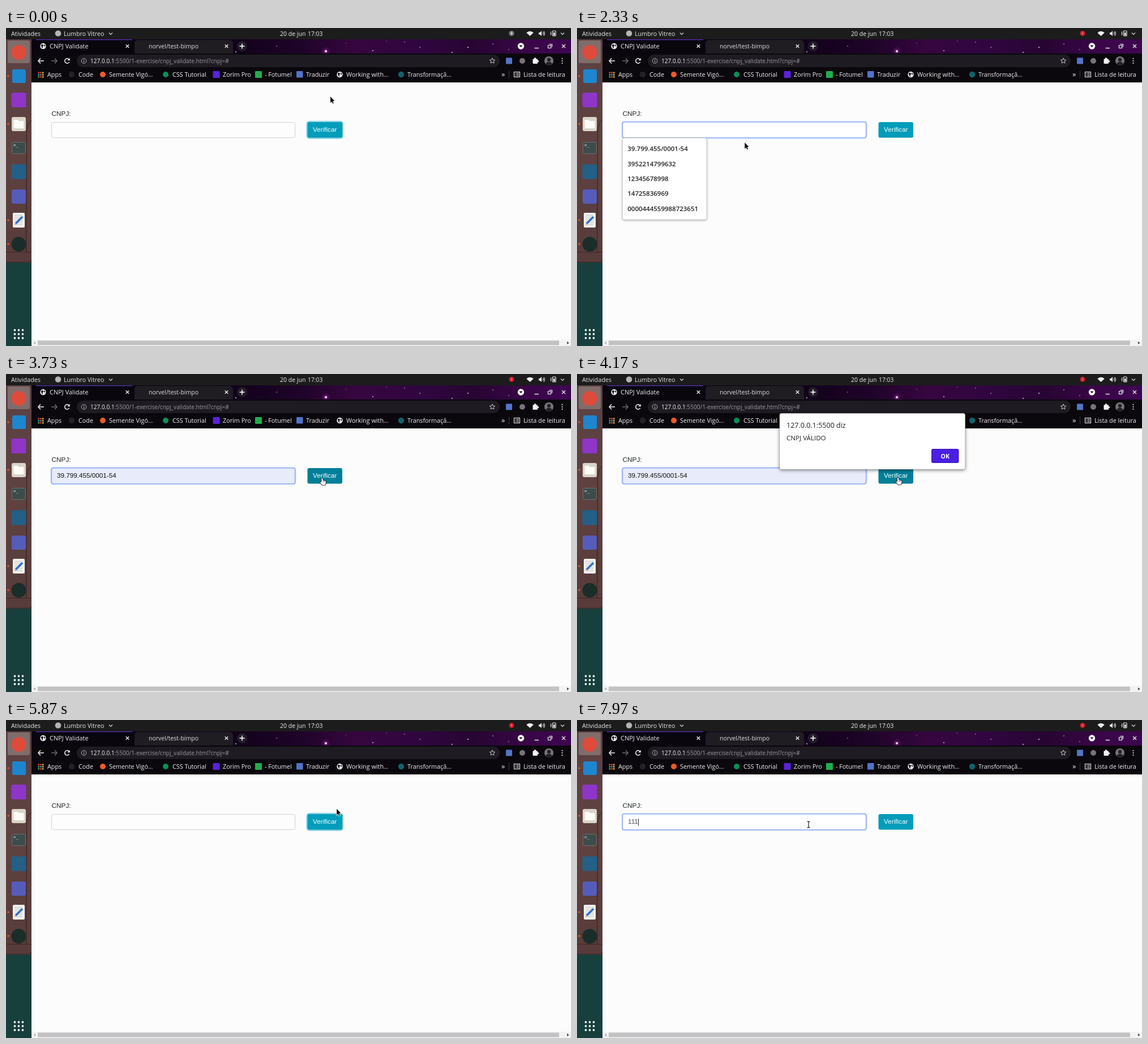
Recreate the animation shown at these times as an HTML page with a canvas. Size 998x561 px, loop 8000 ms.

```html
<!DOCTYPE html>
<html lang="pt-BR">
<head>
<meta charset="utf-8">
<title>CNPJ Validate</title>
<style>
html, body { margin: 0; width: 100%; height: 100%; overflow: hidden; background: #fcfcfc; }
canvas { display: block; width: 998px; height: 561px; }
</style>
</head>
<body>
<canvas id="stage"></canvas>
<script>
const W = 998, H = 561, LOOP = 8000;
const UI = '"Open Sans", "Noto Sans", sans-serif';
const PAGE = '"Liberation Sans", Arial, sans-serif';
const canvas = document.getElementById('stage');
const dpr = window.devicePixelRatio || 1;
canvas.width = Math.round(W * dpr);
canvas.height = Math.round(H * dpr);
let c = canvas.getContext('2d');

// --- drawing helpers ---
function box(x, y, w, h, color, r = 0) {
  c.fillStyle = color;
  c.beginPath();
  c.roundRect(x, y, w, h, r);
  c.fill();
}

function frame(x, y, w, h, color, line = 1, r = 0) {
  c.strokeStyle = color;
  c.lineWidth = line;
  c.beginPath();
  c.roundRect(x, y, w, h, r);
  c.stroke();
}

function dot(x, y, r, color) {
  c.fillStyle = color;
  c.beginPath();
  c.arc(x, y, r, 0, Math.PI * 2);
  c.fill();
}

function path(points, closed) {
  c.beginPath();
  points.forEach(([x, y]) => c.lineTo(x, y));
  if (closed) c.closePath();
}

function line(points, color, width = 1) {
  path(points);
  c.strokeStyle = color;
  c.lineWidth = width;
  c.stroke();
}

function poly(points, color) {
  path(points, true);
  c.fillStyle = color;
  c.fill();
}

// y is the middle of the capitals
function text(s, x, y, size, color, font = UI, weight = 400, align = 'left') {
  c.font = `${weight} ${size}px ${font}`;
  c.textAlign = align;
  c.fillStyle = color;
  c.fillText(s, x, y + size * 0.36);
}

function at(x, y, draw) {
  c.save();
  c.translate(x, y);
  draw();
  c.restore();
}

function shadow(color, blur, dy) {
  c.shadowColor = color;
  c.shadowBlur = blur * dpr;
  c.shadowOffsetY = dy * dpr;
}

function cross(x, y, r) {
  line([[x - r, y - r], [x + r, y + r]], '#eee', 1.3);
  line([[x + r, y - r], [x - r, y + r]], '#eee', 1.3);
}

function chevron(x, y) {
  line([[x - 3, y - 1.5], [x, y + 1.5], [x + 3, y - 1.5]], '#ddd', 1.2);
}

function arrowLine(x, y, dir, color) {
  line([[x - 5 * dir, y], [x + 5 * dir, y]], color, 1.5);
  line([[x + dir, y - 4.5], [x + 5 * dir, y], [x + dir, y + 4.5]], color, 1.5);
}

function globe(x, y) {
  dot(x, y, 5.2, '#f2f2f2');
  poly([[x - 4, y - 2], [x - 1, y - 3.5], [x + 1, y - 1], [x - 1, y + 1], [x, y + 4], [x - 2, y + 3]], '#15121a');
  poly([[x + 1.5, y - 3.5], [x + 4, y - 1], [x + 3, y + 1], [x + 1.5, y - 1]], '#15121a');
}

// --- desktop ---
function topBar() {
  box(0, 0, W, 20, '#1c1c1c');
  text('Atividades', 9, 10, 10.8, '#e6e6e6');
  dot(92, 9.5, 5.3, '#b4b4b4');
  text('Lumbro Vitreo', 102, 10, 10.7, '#e6e6e6');
  chevron(185, 10);
  text('20 de jun', 484, 10, 10.5, '#f0f0f0');
  text('17:03', 533, 10, 10.3, '#f0f0f0');
  c.fillStyle = '#f2f2f2';
  c.beginPath();
  c.moveTo(925.5, 14);
  c.arc(925.5, 14, 8.2, -Math.PI * 0.77, -Math.PI * 0.23);
  c.fill();
  poly([[941, 8], [943, 8], [946, 5], [946, 14], [943, 11.5], [941, 11.5]], '#f2f2f2');
  c.strokeStyle = '#f2f2f2';
  for (const r of [2.5, 5]) {
    c.lineWidth = 1.1;
    c.beginPath();
    c.arc(946.5, 9.7, r, -0.9, 0.9);
    c.stroke();
  }
  frame(965.5, 5, 5.5, 9, '#f2f2f2', 1.2, 1);
  box(967, 8, 2.5, 5, '#f2f2f2');
  line([[963, 6], [961.8, 9.5], [963.2, 9.5], [962, 13]], '#e6e6e6');
  chevron(983, 10);
}

function paper(y) {
  box(12, y - 13, 21, 26, '#f1f1ef', 2);
  for (let i = 0; i < 6; i++) box(15, y - 9 + i * 3.3, 14, 0.8, '#b9b9b9');
  line([[17, y + 6], [29, y - 6]], '#2f6fce', 3.6);
  poly([[14.5, y + 9], [15.8, y + 4.8], [18.4, y + 7.4]], '#e6bd7d');
}

function dock() {
  box(0, 20, 45, H, '#173f3c');
  const g = c.createLinearGradient(0, 20, 0, 414);
  g.addColorStop(0, '#5b4144');
  g.addColorStop(0.5, '#5f4240');
  g.addColorStop(1, '#573b3a');
  box(0, 20, 45, 394, g, [0, 0, 4, 0]);
  line([[45, 163], [39, 168], [36.5, 182], [35.5, 395]], '#33201f');
  line([[0, 395.5], [45, 395.5]], '#3b2827');
  line([[0, 413], [41, 413], [45, 410]], '#3a2525', 1.2);
  box(3, 22, 39, 40, '#806d6b', 3);

  dot(22.5, 43, 13, '#df4b3b');
  box(11, 73, 24, 24, '#1d86cf', 3);
  box(9.5, 114, 26, 26, '#8f35c8', 3);
  box(10, 157, 25, 25, '#dad5c8', 3);
  box(13.5, 162, 8, 4, '#fff', 1);
  box(13.5, 164, 18, 13, '#fdfcf6', 1);
  box(10, 201, 25, 21, '#3d4c4b', 2);
  frame(10.5, 201.5, 24, 20, '#69706c', 1, 2);
  text('>_', 13, 206.5, 7.5, '#fff', '"DejaVu Sans Mono", monospace');
  box(9.5, 240.5, 26, 26, '#235f86', 3);
  box(10, 285, 25, 25, '#565cba', 3);
  paper(339);
  dot(22.5, 381.5, 13, '#1a2d29');
  for (const y of [85, 169, 339, 381]) dot(4, y, 1.7, '#e4552b');
  for (let i = 0; i < 9; i++) dot(15.5 + (i % 3) * 7, 533 + Math.floor(i / 3) * 7, 1.9, '#f2f5f4');
}

// --- browser ---
function tabStrip() {
  const g = c.createLinearGradient(45, 0, W, 0);
  [[0, '#0a0310'], [0.37, '#10021a'], [0.5, '#1f0429'], [0.6, '#36063f'], [0.72, '#300640'],
   [0.82, '#270532'], [0.92, '#3a0648'], [1, '#3d0550']].forEach(s => g.addColorStop(...s));
  box(45, 20, 953, 26, g);
  const glow = c.createRadialGradient(565, 41, 0, 565, 41, 9);
  glow.addColorStop(0, '#8a2492');
  glow.addColorStop(1, 'rgba(60,8,70,0)');
  box(555, 30, 20, 16, glow);
  box(45, 45, 953, 51, '#0a080d');
  box(125, 47, 747, 22, '#1e1c22', 11);
  [[565, 41, 2], [648, 40, 0.9], [704, 25, 0.7], [731, 34, 0.8], [788, 43, 0.9], [816, 34, 1],
   [860, 28, 0.8], [478, 32, 0.7], [406, 42, 0.9], [672, 23, 0.6], [600, 27, 0.5], [888, 38, 0.7]]
    .forEach(([x, y, r]) => dot(x, y, r, '#f4dcfa'));

  box(51, 20, 174, 26, '#09060e', [6, 6, 0, 0]);
  line([[53, 20.6], [223, 20.6]], '#5930bf', 1.4);
  box(227, 21, 174, 24, '#1f1c22', [6, 6, 0, 0]);
  globe(65.5, 32);
  text('CNPJ Validate', 77, 32.2, 11, '#f0f0f0');
  cross(214.5, 32, 2.8);
  text('norvel/test-bimpo', 252, 32.2, 10.5, '#e0e0e0');
  cross(389.5, 32, 2.8);
  dot(417, 32, 9, '#241b29');
  line([[412.5, 32], [421.5, 32]], '#fff', 1.6);
  line([[417, 27.5], [417, 36.5]], '#fff', 1.6);

  dot(909.5, 32, 5.7, '#f8f8f8');
  poly([[906.5, 30.5], [912.5, 30.5], [909.5, 34]], '#17121b');
  line([[933.5, 35.5], [941, 35.5]], '#f0f0f0', 1.4);
  frame(957.5, 30.5, 5, 5, '#f0f0f0', 1.2);
  line([[959.5, 28.5], [964.5, 28.5], [964.5, 33.5]], '#f0f0f0', 1.2);
  cross(985, 32, 3);
}

function toolbar() {
  arrowLine(62, 58, -1, '#f2f2f2');
  arrowLine(85, 58, 1, '#6e6b70');
  c.strokeStyle = '#f2f2f2';
  c.lineWidth = 1.5;
  c.beginPath();
  c.arc(108, 58, 4.2, 0.5, 5.5);
  c.stroke();
  poly([[112.8, 53], [112.8, 57.3], [108.5, 57.3]], '#f2f2f2');

  c.strokeStyle = '#b8b8b8';
  c.lineWidth = 1;
  c.beginPath();
  c.arc(137.5, 58, 4.3, 0, 7);
  c.stroke();
  box(137, 57.2, 1.1, 3.3, '#b8b8b8');
  box(137, 55.2, 1.1, 1.1, '#b8b8b8');
  const host = '127.0.0.1';
  text(host, 149, 58, 10.1, '#f0f0f0');
  text(':5500/1-exercise/cnpj_validate.html?cnpj=#', 149 + c.measureText(host).width, 58, 10.1, '#9b9b9f');

  const star = [];
  for (let i = 0; i < 11; i++) {
    const a = i * Math.PI / 5 - Math.PI / 2, r = i % 2 ? 2.3 : 5;
    star.push([859 + Math.cos(a) * r, 58 + Math.sin(a) * r]);
  }
  line(star, '#c8c8c8');
  box(883, 52.5, 11, 11, '#5274c9', 1);
  dot(912, 58, 5, '#77737a');
  box(930.5, 54.5, 8.5, 8.5, '#f2f2f2', 1);
  dot(934.5, 54, 1.8, '#f2f2f2');
  dot(939.5, 58.7, 1.8, '#f2f2f2');
  c.save();
  c.beginPath();
  c.arc(959, 58, 8, 0, 7);
  c.clip();
  box(951, 50, 16, 16, '#777479');
  dot(959, 56, 3.2, '#242126');
  dot(959, 66, 6.5, '#242126');
  c.restore();
  for (const y of [54, 58, 62]) dot(982.5, y, 1.1, '#f2f2f2');
}

function bookmarks() {
  const tints = ['#e0443a', '#e0443a', '#e9b52d', '#49a75a', '#4a86e8', '#e9b52d', '#49a75a', '#e0443a', '#e9b52d'];
  tints.forEach((t, i) => box(56.5 + (i % 3) * 3.7, 77.5 + Math.floor(i / 3) * 3.7, 2.6, 2.6, t));
  dot(116, 82, 5.3, '#232127');
  dot(171, 82, 5, '#f05a28');
  dot(282, 82, 5, '#0a8e58');
  box(365.5, 76, 12, 12, '#5a22dc', 1);
  box(440, 76, 12, 12, '#1fae4c', 1);
  box(513, 76, 11.5, 11.5, '#5274c9', 1);
  globe(589.5, 82);
  dot(698, 82, 5.2, '#12626b');
  [['Apps', 73], ['Code', 128], ['Semente Vigó…', 182], ['CSS Tutorial', 294], ['Zorim Pro', 383],
   ['- Fotumel', 457], ['Traduzir', 530], ['Working with…', 601], ['Transformaçã…', 709], ['Lista de leitura', 914]]
    .forEach(([s, x]) => text(s, x, 82, 10.8, '#f0f0f0'));
  text('»', 875, 81.5, 13, '#f0f0f0');
  line([[888.5, 75], [888.5, 89]], '#3c3940');
  frame(897.5, 77.5, 10, 9, '#e8e8e8', 1.1);
  for (const y of [79.7, 82, 84.3]) {
    box(899.3, y - 0.5, 1.2, 1, '#e8e8e8');
    box(901.5, y - 0.5, 4.5, 1, '#e8e8e8');
  }
}

function pageBase() {
  box(45, 96, 953, 465, '#fcfcfc');
  text('CNPJ:', 80.5, 151, 11.8, '#212529', PAGE);
  box(45, 550, 953, 11, '#f3f3f3');
  box(56, 551.5, 921, 8, '#c2c2c5');
  poly([[49, 555.5], [52, 553], [52, 558]], '#a3a3a3');
  poly([[994.5, 555.5], [991, 553], [991, 558]], '#3f3f3f');
}

// --- moving parts ---
const ENTRIES = ['39.799.455/0001-54', '3952214799632', '12345678998', '14725836969', '0000444559988723651'];
const T = {
  record: 400, focus: 1700, list: 1800, hoverRow: 2480, pick: 2900, picked: 3080,
  alert: 4080, leave: 4400, close: 5520, refocus: 6370, relist: 6470,
  keys: [7330, 7560, 7800]
};
const ROUTE = [
  [0, 573, 121], [400, 573, 121], [1300, 403, 184.5], [1950, 403, 184.5], [2600, 233, 212.5], [3080, 233, 212.5],
  [3800, 567, 183], [4400, 567, 183], [5150, 646, 145], [5650, 646, 145], [6250, 444.5, 183],
  [6750, 444.5, 183], [7250, 409, 184.5], [LOOP, 409, 184.5]
];
const between = (t, a, b) => t >= a && t < b;

function pointer(t) {
  const i = ROUTE.findIndex(p => p[0] > t);
  const [t0, x0, y0] = ROUTE[i - 1], [t1, x1, y1] = ROUTE[i];
  let k = (t - t0) / (t1 - t0);
  k = k * k * (3 - 2 * k);
  return [x0 + (x1 - x0) * k, y0 + (y1 - y0) * k];
}

const inside = ([x, y], l, tp, r, b) => x > l && x < r && y > tp && y < b;

function indicator(t) {
  const on = t >= T.record;
  dot(893, 9.5, 4.6, on ? '#c81e28' : '#77777a');
  box(891.7, 6.5, 2.6, 5.5, on ? '#e8525a' : '#c4c4c6', 1);
}

function input(t, value, filled, focused) {
  if (focused) {
    frame(80.5, 166, 430, 27.5, '#c4d4fc', 4, 3);
    box(80.5, 166, 430, 27.5, filled ? '#e8ecfa' : '#fff', 3);
    frame(80.5, 166, 430, 27.5, '#86a5f4', 1.2, 3);
  } else {
    box(80.5, 166.5, 430, 27, '#fdfdfd', 3);
    frame(80.5, 166.5, 430, 27, '#cdd1d9', 1, 3);
  }
  text(value, 90, 179.2, 11.7, filled ? '#101010' : '#495057', PAGE);
  const end = 90.5 + c.measureText(value).width;
  const hidden = between(t, T.alert, T.close) || between(t, T.hoverRow, T.pick);
  const start = t < T.pick ? T.focus : t < T.refocus ? T.pick : t < T.keys[0] ? T.refocus : T.keys.findLast(k => t >= k);
  if (focused && !hidden && (t - start) % 1000 < 500) box(end - 0.4, 174, 1, 12.5, '#222');
}

function button(hover, focused) {
  if (focused) frame(532, 165.5, 62.5, 28.5, '#8ed4e5', 3.4, 4);
  box(532.5, 166, 61.5, 27.5, hover ? '#007f98' : '#009dba', 3);
  text('Verificar', 563.2, 179.2, 11.7, '#fff', PAGE, 400, 'center');
}

function suggestions(items, hoverRow, fade) {
  c.save();
  c.globalAlpha = 1 - fade * 0.82;
  const h = items.length * 26.3 + 12.5, k = 1 - fade * 0.043;
  c.translate(154.5, 266);
  c.scale(k, k);
  c.translate(-154.5, -266);
  c.save();
  if (!fade) shadow('rgba(0,0,0,.4)', 4, 1);
  box(80.5, 194, 148.5, h, '#fff', 3);
  c.restore();
  frame(80.5, 194, 148.5, h, '#d0d0d6', 0.8, 3);
  if (hoverRow) box(81, 200, 147.5, 26.3, '#dcdce0');
  items.forEach((s, i) => text(s, 89.3, 213.3 + i * 26.3, 11.5, '#202124', UI, 600));
  c.restore();
}

function alertBox(hover) {
  c.save();
  shadow('rgba(0,0,0,.55)', 6, 1.5);
  box(358, 69.5, 327.5, 98.5, '#fff', 3);
  c.restore();
  frame(358, 69.5, 327.5, 98.5, '#bdbdbd', 0.6, 3);
  text('127.0.0.1:5500 diz', 370, 90.3, 12.5, '#202124');
  text('CNPJ VÁLIDO', 370, 113.3, 11.6, '#202124');
  box(626, 132, 48.5, 25, hover ? '#5b32e0' : '#4a1fe2', 3);
  frame(627, 133, 46.5, 23, hover ? '#7753e6' : '#3a15bd', 1, 2);
  text('OK', 650.2, 144.7, 10.6, '#fff', UI, 700, 'center');
}

function outlined(points, fill, edge) {
  path(points, true);
  c.lineJoin = 'round';
  c.lineWidth = 1.6;
  c.strokeStyle = edge;
  c.stroke();
  c.fillStyle = fill;
  c.fill();
}

function cursor(kind, [x, y]) {
  at(x, y, () => {
    if (kind === 'beam') {
      line([[0, -5], [0, 5]], '#111', 1.2);
      line([[-2.5, -5.3], [2.5, -5.3]], '#111', 1.2);
      line([[-2.5, 5.3], [2.5, 5.3]], '#111', 1.2);
    } else if (kind === 'hand') {
      outlined([[-1, 0], [1, 0], [1.4, 4], [6, 5], [6.6, 7], [5.5, 12], [0, 12], [-3.6, 7.5], [-2.8, 6.3], [-1, 7.5]], '#fff', '#111');
      for (const fx of [2, 4]) line([[fx, 5], [fx, 7]], '#111', 0.7);
    } else {
      outlined([[0, 0], [0, 11], [2.4, 8.8], [4.1, 12.4], [5.8, 11.5], [4.2, 8], [7.4, 7.8]], '#111', '#fff');
    }
  });
}

function scene(t) {
  const pos = pointer(t);
  const alerting = between(t, T.alert, T.close);
  const filled = between(t, T.hoverRow, T.close);
  const focused = between(t, T.focus, T.close) || t >= T.refocus;
  const typed = T.keys.filter(k => t >= k).length;
  const onButton = inside(pos, 532, 165, 595, 194);
  const onInput = inside(pos, 80, 165, 511, 194);

  indicator(t);
  input(t, filled ? ENTRIES[0] : '1'.repeat(typed), filled, focused);
  button(onButton || alerting, !focused);

  if (between(t, T.list, T.picked)) {
    const fade = Math.min(1, Math.max(0, (t - T.pick) / 100));
    suggestions(ENTRIES, t >= T.hoverRow, fade);
  } else if (t >= T.relist && typed < 2) {
    suggestions(typed ? ENTRIES.filter(s => s[0] === '1') : ENTRIES, false, 0);
  }
  if (alerting) alertBox(inside(pos, 626, 132, 675, 157));

  const frozen = alerting && t < T.leave + 40;
  const kind = alerting && !frozen ? 'arrow' : onInput ? 'beam' : onButton ? 'hand' : 'arrow';
  cursor(kind, pos);
}

// the fixed picture is drawn once
const still = document.createElement('canvas');
still.width = canvas.width;
still.height = canvas.height;
const live = c;
c = still.getContext('2d');
c.scale(dpr, dpr);
[pageBase, tabStrip, toolbar, bookmarks, dock, topBar].forEach(draw => draw());
c = live;

function tick() {
  c.setTransform(1, 0, 0, 1, 0, 0);
  c.drawImage(still, 0, 0);
  c.scale(dpr, dpr);
  scene(performance.now() % LOOP);
  requestAnimationFrame(tick);
}
tick();
</script>
</body>
</html>
```
